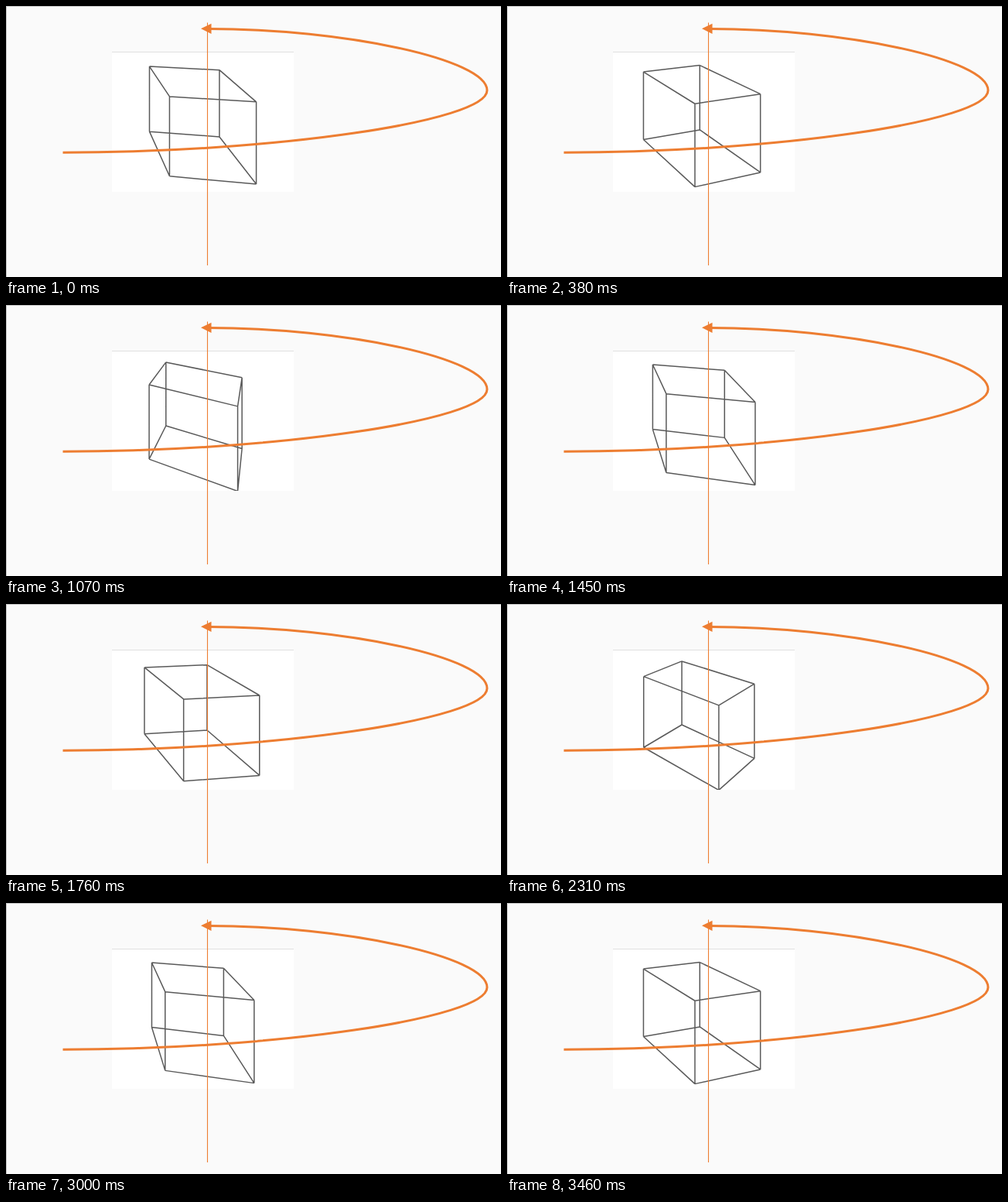
Recreate the animation shown at these times as an HTML page. Size 640 by 350 pixels, loop 3.54 s.

```html
<!DOCTYPE html>
<html lang="en">
<head>
<meta charset="utf-8">
<title>Rotating cube</title>
<style>
  html, body { margin: 0; width: 100%; height: 100%; overflow: hidden; background: #fafafa; }
  svg { display: block; width: 640px; height: 350px; }
</style>
</head>
<body>
<svg viewBox="0 0 640 350" fill="none">
  <clipPath id="panel"><path d="M137 59H372V240H137Z"/></clipPath>
  <path d="M0 350V.5H640M.5 0V350" stroke="#c4c4c4"/>
  <path d="M137 59H372V240H137Z" fill="#fff"/>
  <path d="M137 59.5H372" stroke="#e0e0e0"/>
  <path id="cube" clip-path="url(#panel)" stroke="#000" stroke-opacity=".65" stroke-width="1.5"/>
  <path d="M260.5 21.5V335" stroke="#ed7d31" stroke-width="1.1"/>
  <path d="M73.5 189.2C347.5 189.2 622 149 622 109S437 29.5 262 29.5" stroke="#ed7d31" stroke-width="3"/>
  <path d="M252 29.3L265.5 22.8V36Z" fill="#ed7d31"/>
</svg>
<script>
const LOOP = 3540, STEP = 77, LAST = 45;
const FOCAL = 457.4, RADIUS = 0.709;
const VANISH = { x: 5, y: -96 };
const CENTER = { x: 2.573, top: 2.07, z: 4.873 };
// Turn in degrees at a few steps; the speed is nearly constant.
const TURN = [[0, 127], [5, 149.8], [14, 189.3], [23, 230.7], [30, 260.3], [39, 302.2], [45, 329.8]];

const cube = document.getElementById('cube');

function turnAt(step) {
  const i = Math.max(1, TURN.findIndex(([s]) => s >= step));
  const [s0, a0] = TURN[i - 1], [s1, a1] = TURN[i];
  return a0 + (a1 - a0) * (step - s0) / (s1 - s0);
}

function corner(degrees) {
  const a = degrees * Math.PI / 180;
  const scale = FOCAL / (CENTER.z + RADIUS * Math.sin(a));
  const x = VANISH.x + scale * (CENTER.x + RADIUS * Math.cos(a));
  const top = VANISH.y + scale * CENTER.top;
  return { x, top, bottom: top + scale };
}

function draw(now) {
  const step = Math.min(LAST, Math.floor((now % LOOP + 12) / STEP));
  const corners = [0, 90, 180, 270].map(d => corner(turnAt(step) + d));
  cube.setAttribute('d', corners.map((p, i) => {
    const q = corners[(i + 1) % 4];
    return `M${p.x} ${p.top}L${q.x} ${q.top}M${p.x} ${p.bottom}L${q.x} ${q.bottom}M${p.x} ${p.top}V${p.bottom}`;
  }).join(''));
}

const start = performance.now();
function tick() {
  draw(performance.now() - start);
  requestAnimationFrame(tick);
}
tick();
</script>
</body>
</html>
```
